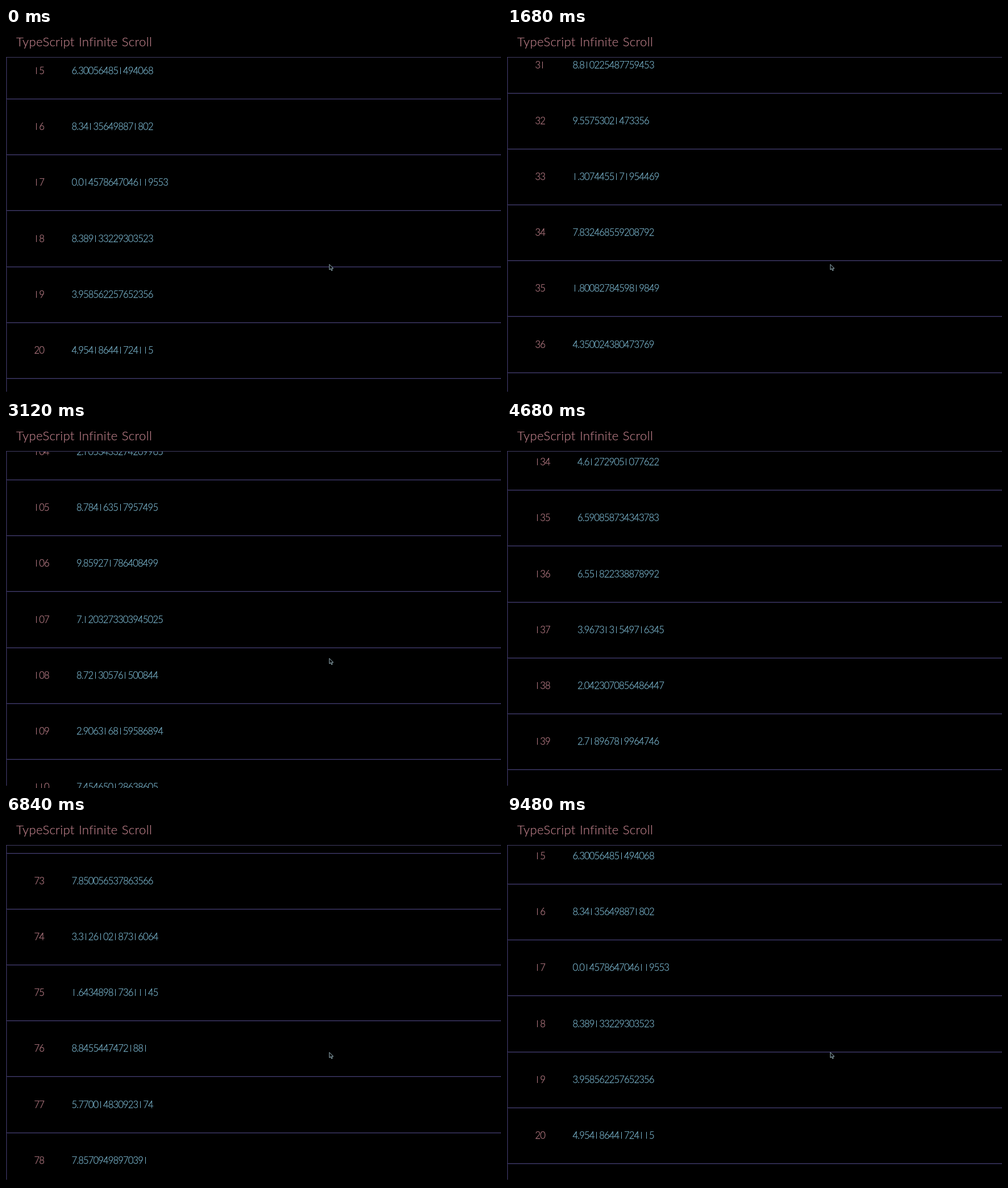
Animation, 871 px wide and 643 px high, one loop 9600 ms. Source, as an HTML page:

```html
<!DOCTYPE html>
<html lang="en">
<head>
<meta charset="utf-8">
<title>TypeScript Infinite Scroll</title>
<style>
  html, body { margin: 0; width: 100%; height: 100%; overflow: hidden; background: #000; }
  body {
    position: relative; font-family: Lato, "Open Sans", sans-serif; font-weight: 300;
    -webkit-text-stroke: .25px currentColor;
  }
  h1 {
    position: absolute; left: 18px; top: 9px; margin: 0;
    font-size: 22px; line-height: 30px; font-weight: 300; color: #b57a83;
    letter-spacing: .35px; word-spacing: .9px; white-space: nowrap;
  }
  #list {
    position: absolute; left: 0; top: 51px; width: 871px; height: 592px; overflow: hidden;
  }
  #list::before {
    content: ""; position: absolute; left: 0; top: 0; width: 1px; height: 588px;
    background: #302b50; box-shadow: 1px 0 #1a172c;
  }
  #list::after {
    content: ""; position: absolute; left: 0; top: 0; width: 871px; height: 1px;
    background: #403b62;
  }
  .row {
    position: absolute; left: 1px; width: 870px; height: 98px; box-sizing: border-box;
    border-bottom: 1px solid #423c6a; box-shadow: 0 1px #15132a;
    font-size: 16.6px; line-height: 97px; letter-spacing: -.86px; white-space: pre;
  }
  .row span { position: absolute; top: 0; }
  .id { left: 48.5px; color: #b57a83; }
  .value { color: #78b3cb; }
  /* the digit one is a plain upright bar */
  .row i {
    font-style: normal; -webkit-text-fill-color: transparent; -webkit-text-stroke: 0;
    background: linear-gradient(currentColor, currentColor) 3.7px 4px / 1.2px 12px no-repeat;
  }
  #cursor { position: absolute; left: 567px; top: 413px; }
</style>
</head>
<body>
<h1>TypeScript Infinite Scroll</h1>
<div id="list"></div>
<svg id="cursor" width="12" height="17" viewBox="0 0 12 17">
  <path d="M2 2.3V11.7L4.3 9.8L5.8 13.3L7.4 12.6L6 9.3H8.9Z" fill="#050708" stroke="#a9c6d0" stroke-width=".9"/>
</svg>
<script>
const LOOP = 9600, STEP = 120, PITCH = 98.17, FIRST = 15;

// The opening screen; every other reading is seeded by its row id
const opening = [
  "6.300564851494068", "8.341356498871802", "0.014578647046119553",
  "8.389133229303523", "3.958562257652356", "4.954186441724115"
];

function reading(id) {
  const x = Math.sin(id * 127.1 + 3.7) * 43758.5453;
  return opening[id - FIRST] || String((x - Math.floor(x)) * 10).slice(0, 18);
}

// Scroll offset at a few times; flat pieces are pauses between swipes
const stops = [
  [0, 0], [960, 620], [1080, 620], [1680, 1581], [3120, 8760], [4320, 11687],
  [5280, 11687], [6840, 5655], [8160, 1140], [8520, 640], [8640, 640], [9480, 5], [LOOP, 5]
];

const slope = k => {
  const a = stops[k], b = stops[k + 1];
  return a && b ? (b[1] - a[1]) / (b[0] - a[0]) : 0;
};

// Harmonic mean of the neighbouring slopes: smooth, no overshoot, still at pauses
const speed = k => {
  const a = slope(k - 1), b = slope(k);
  return a * b > 0 ? 2 * a * b / (a + b) : 0;
};

function offsetAt(t) {
  const k = stops.findIndex(p => p[0] > t) - 1;
  const [t0, p0] = stops[k], [t1, p1] = stops[k + 1];
  const d = t1 - t0, u = (t - t0) / d, w = 1 - u;
  return w * w * ((1 + 2 * u) * p0 + u * d * speed(k)) +
         u * u * ((3 - 2 * u) * p1 - w * d * speed(k + 1));
}

const list = document.getElementById("list");
const cursor = document.getElementById("cursor");
const bars = s => s.replace(/1/g, "<i>1</i>");

const rows = Array.from({ length: 8 }, () => {
  const row = document.createElement("div");
  row.className = "row";
  row.innerHTML = '<span class="id"></span><span class="value"></span>';
  list.append(row);
  return row;
});

function draw(t) {
  const s = offsetAt(t);
  const top = Math.floor(s / PITCH) + FIRST - 1;
  rows.forEach((row, i) => {
    const id = top + i, label = String(id), [name, value] = row.children;
    row.style.top = Math.round((id - FIRST) * PITCH - s - 24) + "px";
    name.innerHTML = bars(label);
    value.innerHTML = bars(reading(id));
    value.style.left = 97.4 + label.length * 8.5 + "px";
  });
  cursor.style.visibility = t >= 4680 && t < 5040 ? "hidden" : "visible";
}

const begin = performance.now();
let last = -1;
function tick() {
  const t = Math.floor(((performance.now() - begin) % LOOP) / STEP) * STEP;
  if (t !== last) draw(last = t);
  requestAnimationFrame(tick);
}
tick();
</script>
</body>
</html>
```
